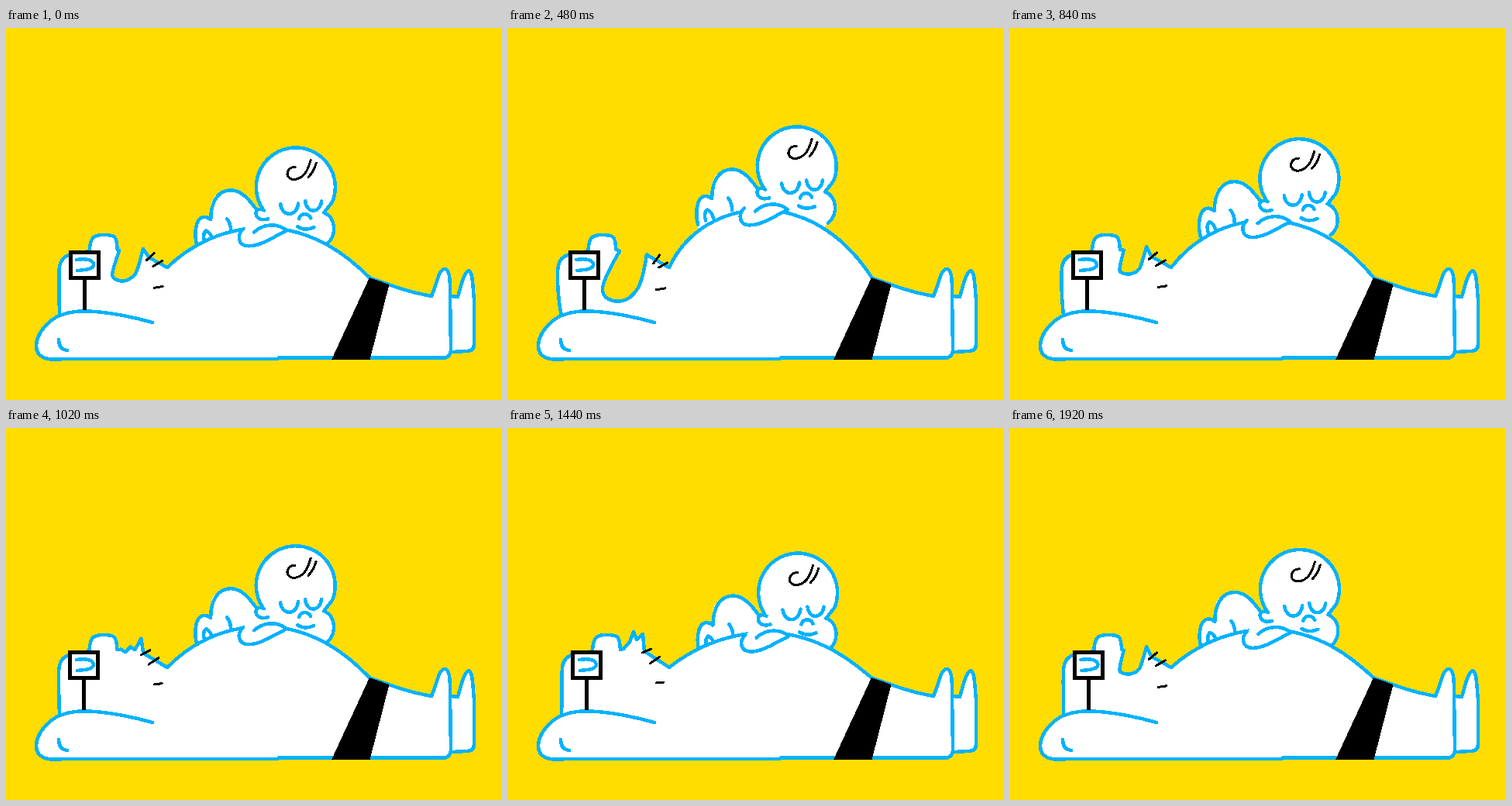
Animation of 640 by 480 pixels, one loop 1.98 s. Source, as an HTML page:

```html
<!DOCTYPE html>
<html lang="en">
<head>
<meta charset="utf-8">
<title>Nap</title>
<style>
  html, body { margin: 0; width: 100%; height: 100%; overflow: hidden; background: #fd0; }
  svg { display: block; width: 640px; height: 480px; }
  path, rect { fill: none; stroke: #00b2ff; stroke-width: 4.5; stroke-linecap: round; stroke-linejoin: round; }
  .skin { fill: #fff; }
  .bare { fill: #fff; stroke: none; }
  .ink { stroke: #000; stroke-width: 3; }
  .lens { fill: #fff; stroke: #000; stroke-width: 5; stroke-linejoin: miter; }
  .stem { stroke: #000; stroke-width: 5; stroke-linecap: butt; }
  .trunks { fill: #000; stroke: none; }
</style>
</head>
<body>
<svg viewBox="0 0 640 480" shape-rendering="crispEdges">
  <!-- baby, tucked behind the belly -->
  <g class="baby">
    <path class="bare" d="M264 246 L264 228 C267 214 277 209 290 209 C306 209 317 226 326 238 L350 300 L246 300 L246 277 C243 268 244 260 246 253 C249 243 257 241 264 249 Z"/>
    <path d="M326 238 C317 226 306 209 290 209 C274 209 264 223 264 247 C257 241 249 243 246 253 C244 260 243 268 246 280"/>
    <path d="M285 246 Q290 252 290 262 M256 275 Q253 265 258 261 Q264 264 266 272"/>
    <path class="bare" d="M331 233 A51 51 0 1 1 421 224 L410 238 C426 244 427 268 414 276 L400 300 L335 300 Z"/>
    <path d="M331 233 A51 51 0 1 1 421 224 L410 238 C426 244 427 268 414 278"/>
    <path class="skin" d="M333 235 C324 231 321 237 323 242 C326 247 331 248 338 246"/>
    <path d="M354 227 C356 244 375 244 377 226 M386 223 C388 240 405 239 407 223"/>
    <path d="M378 246 C380 238 390 238 393 245 M376 256 Q385 262 397 257"/>
    <path class="ink" d="M373 179 C365 179 362 185 363 190 C367 198 378 196 385 188 C390 182 391 176 393 170 M400 174 Q397 185 390 192"/>
  </g>

  <path class="skin" d="M574 346 L583 347 C588 328 592 314 597 313 C603 315 602 335 604 350 L604 408 Q604 417 594 417 L575 418"/>
  <path class="skin" id="body"/>
  <path d="M69 371 C85 365 95 365.5 105 365.5 C130 366 165 373 189 380 M68 402 C68 410 72 415 79 416"/>
  <path class="trunks" d="M469 322 L494.5 331 L469.5 428 L420 428 Z"/>
  <path class="ink" id="whiskers"/>

  <g id="glass">
    <path class="stem" d="M101 323 L101 364"/>
    <rect class="lens" x="83" y="289" width="36" height="33"/>
    <path d="M91 299 C103 297 112 299 113 305 C113 311 104 312 92 313"/>
  </g>

  <!-- baby's arm, resting on top -->
  <g class="baby">
    <path class="bare" d="M306 260 L312 253 L338 250 L362 261 C340 273 328 281 313 281 C300 281 297 268 306 260 Z"/>
    <path d="M306 259 C298 266 298 281 313 281 C328 281 342 271 362 261 C350 251 332 252 320 263"/>
  </g>
</svg>
<script>
const LOOP = 1980, STEP = 60;
const PEAK = 600, REST = 1620;           // fullest and emptiest belly
const YAWN_START = 1680, YAWN_TIME = 1380;

// Mouth outline from upper lip to chin, and stubble strokes, at both extremes.
const mouth = {
  shut: [[149, 285], [157, 276], [162, 263], [166, 273], [174, 266], [176, 288]],
  open: [[144, 288], [121, 338], [143, 354], [168, 336], [179, 293], [192, 300]]
};
const stubble = {
  shut: [[173, 290], [185, 285], [183, 304], [196, 295], [191, 329], [201, 328]],
  open: [[188, 304], [196, 293], [195, 309], [206, 303], [191, 338], [203, 336]]
};

const $ = id => document.getElementById(id);
const babies = document.querySelectorAll('.baby');
const since = (t, from) => (t - from + LOOP) % LOOP;
const mix = (a, b, u) => a + (b - a) * u;
const smooth = u => u * u * (3 - 2 * u);

// Slow breath in, quick release that tails off.
function breath(t) {
  if (t >= PEAK && t < REST) return (1 - (t - PEAK) / (REST - PEAK)) ** 2.5;
  return smooth((since(t, REST) / (LOOP - REST + PEAK)) ** 1.25);
}

function yawn(t) {
  const u = since(t, YAWN_START) / YAWN_TIME;
  return u < 1 ? Math.sin(Math.PI * u) ** 1.3 : 0;
}

// The jaw drops ahead of its sideways move.
const drop = m => m ** 0.6;
const pose = (shape, m) => shape.shut.map(([x, y], i) =>
  [mix(x, shape.open[i][0], m), mix(y, shape.open[i][1], drop(m))]);

// Smooth curve through the points, with corners at both ends.
function spline(pts, round) {
  const last = pts.length - 1;
  const handle = (i, sign) => pts[i].map((v, n) =>
    i === 0 || i === last ? v : v + sign * round * (pts[i + 1][n] - pts[i - 1][n]) / 5);
  let d = '';
  for (let i = 0; i < last; i++) d += `C${handle(i, 1)} ${handle(i + 1, -1)} ${pts[i + 1]}`;
  return d;
}

function bellyPath(air) {
  const top = 263.5 - 31 * air;
  return `M208 309C${250 - 22 * air} ${276 - 14 * air} ${294 - 20 * air} ${265 - 33 * air} ${336 - 4 * air} ${top}` +
    `C${401 - 6 * air} ${top + 4} 440 ${298 - 23 * air} 470 323`;
}

const legsAndArm = 'L494 331Q520 341 549 346C556 330 558 312 566 311C573 311 573 325 573 345' +
  'L574 415Q574 423 567 425.5L352 425.5L350 427L75 427C50 430 39 424 39 410C39 396 52 379 69 371';

function headPath(shift, m) {
  const x = v => v + shift;
  const pts = pose(mouth, m), lips = pts.slice(0, 5);
  return `C${x(68)} 350 ${x(67)} 325 ${x(68)} 310Q${x(70)} 294 ${x(85)} 292L${x(107)} 288` +
    `C${x(108)} 270 ${x(112)} 267 ${x(125)} 267C${x(140)} 267 ${x(142)} 268 ${x(143)} 286` +
    `L${lips[0]}${spline(lips, drop(m))}L${pts[5]}L208 309Z`;
}

function draw(t) {
  const air = breath(t), m = yawn(t);
  const place = `translate(${0.5 - 1.5 * air} ${8 - 37 * air})`;
  babies.forEach(g => g.setAttribute('transform', place));
  $('body').setAttribute('d', bellyPath(air) + legsAndArm + headPath(2 - 6 * air, m));
  $('whiskers').setAttribute('d', pose(stubble, m).map((p, i) => (i % 2 ? 'L' : 'M') + p).join(''));
  $('glass').setAttribute('transform', `translate(${1 - 4 * air} 0)`);
}

const start = performance.now();
function tick() {
  const t = (performance.now() - start) % LOOP;
  draw(Math.floor(t / STEP) * STEP);
  requestAnimationFrame(tick);
}
tick();
</script>
</body>
</html>
```
